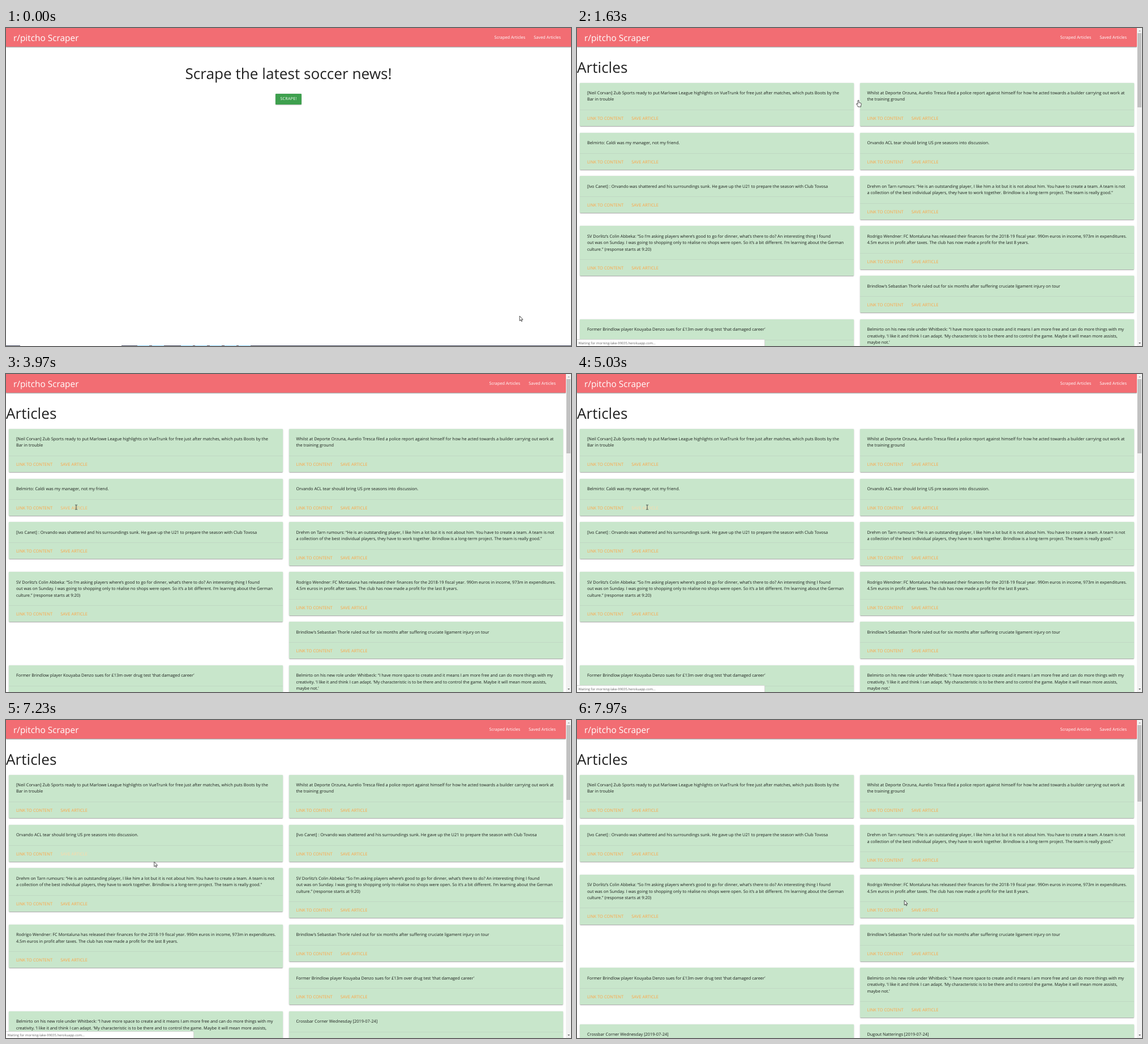
An HTML page that plays this animation: 998 px wide and 561 px high, repeating every 8 s.

```html
<!DOCTYPE html>
<html lang="en">
<head>
<meta charset="utf-8">
<title>Scraper</title>
<style>
  :root { font-size: 7.63px; }
  html, body { margin: 0; width: 100%; height: 100%; overflow: hidden; background: #fff; }
  body { position: relative; font: 7.4px/1.5rem "Open Sans", "Noto Sans", sans-serif;
         color: rgba(0, 0, 0, .87); text-rendering: geometricPrecision; }
  #stage { position: absolute; left: 0; top: 0; width: 998px; height: 561px; overflow: hidden; }
  #stage * { box-sizing: border-box; }

  .page { position: absolute; inset: 0; overflow: hidden; animation: 8s step-end infinite; }
  .home { animation-name: home; }
  .list { visibility: hidden; }
  .list1 { animation-name: list1; --thumb: 131px; }
  .list2 { animation-name: list2; --thumb: 132px; }
  .list3 { animation-name: list3; --thumb: 135px; }
  @keyframes home  { 0% { visibility: visible } 20.375%, 100% { visibility: hidden } }
  @keyframes list1 { 0%, 66.25%, 100% { visibility: hidden } 20.375% { visibility: visible } }
  @keyframes list2 { 0%, 91.25%, 100% { visibility: hidden } 66.25% { visibility: visible } }
  @keyframes list3 { 0% { visibility: hidden } 91.25%, 100% { visibility: visible } }

  .view { position: absolute; left: 0; top: 0; width: 989px; height: 561px; }
  .home .view { width: 998px; }
  nav { position: absolute; left: 0; top: 0; width: 100%; height: 33px; padding: 0 18px 0 13px;
        display: flex; align-items: center; gap: 15px; background: #f26d73; color: #fff; }
  nav, .card { box-shadow: 0 1px 1px rgba(0,0,0,.14), 0 1.5px .5px -1px rgba(0,0,0,.12), 0 .5px 2.5px rgba(0,0,0,.2); }
  nav b { font-size: 15.4px; font-weight: 400; margin-right: auto; padding-top: 1.5px; }
  nav span { padding-top: 1.5px; }
  h1 { position: absolute; left: 0; top: 54px; margin: 0; font-size: 26.2px; font-weight: 400;
       line-height: 30px; white-space: nowrap; }
  .home h1 { top: 65px; width: 100%; text-align: center; }

  .button { position: absolute; left: 476px; top: 116px; width: 46px; height: 18.5px; border-radius: 1px;
            background: #3ea04e; color: #fff; font-size: 7.1px; line-height: 18.5px; letter-spacing: .25px;
            text-align: center; animation: lift 8s linear infinite; }
  @keyframes lift {
    0%, 7.9% { box-shadow: 0 1px 1px rgba(0,0,0,.14), 0 .5px 2.5px rgba(0,0,0,.2) }
    10.375%, 100% { box-shadow: 0 1.5px 1.5px rgba(0,0,0,.16), 0 1px 3.5px rgba(0,0,0,.24) }
  }
  .taskbar { position: absolute; left: 0; top: 560px; width: 100%; height: 1px; background: #474c62;
             animation: taskbar 8s step-end infinite; }
  .taskbar i { position: absolute; top: 0; height: 1px; background: #8fd3f7; }
  @keyframes taskbar { 0% { opacity: 1 } 6.25%, 100% { opacity: 0 } }

  .row { position: absolute; left: 0; top: 92.9px; width: 100%; }
  .col { float: left; width: 50%; padding: 0 .7rem; }
  .col::before, .col::after { content: ""; display: table; }
  .card { margin: .5rem 0 1rem; background: #c8e6cb; border-radius: 1px; }
  .card p { margin: 0; padding: 1.75rem 1.65rem 1.45rem; white-space: pre; }
  .actions { height: 29.3px; padding: 0 1.65rem; border-top: 1px solid rgba(160,160,160,.2);
             line-height: 30.5px; font-size: 7.5px; color: #ffa545; white-space: nowrap; }
  .actions span { margin-right: 1.6rem; }
  .list1 .col:nth-child(3) span + span { animation: hover1 8s linear infinite; }
  .list2 .col:nth-child(3) span + span { animation: hover2 8s linear infinite; }
  @keyframes hover1 { 0%, 48.75% { color: #ffa545 } 52.125%, 100% { color: #ffd8a6 } }
  @keyframes hover2 { 0%, 71.25% { color: #ffa545 } 74.625%, 100% { color: #ffd8a6 } }

  .scrollbar { position: absolute; left: 989px; top: 0; width: 9px; height: 561px; background: #f1f1f1; }
  .scrollbar::before, .scrollbar::after { content: ""; position: absolute; left: 3px; width: 4px; height: 2px; }
  .scrollbar::before { top: 4px; background: #a3a3a3; clip-path: polygon(50% 0, 100% 100%, 0 100%); }
  .scrollbar::after { bottom: 4px; background: #505050; clip-path: polygon(0 0, 100% 0, 50% 100%); }
  .scrollbar i { position: absolute; left: 1px; top: 9px; width: 7px; height: var(--thumb); background: #c1c1c1; }

  .status { position: absolute; left: -1px; top: 549px; width: 333px; height: 13px; padding-left: 2.5px;
            background: #fff; border: 1px solid #d4d4d4; border-top-right-radius: 2px; color: #666;
            font-size: 5.9px; line-height: 12px; white-space: nowrap; animation: status 8s linear infinite; }
  @keyframes status {
    0%, 13.75%, 26.25%, 61.25%, 71.25%, 86.25%, 96.25%, 100% { opacity: 0 }
    16.25%, 23.75%, 62.875%, 68.75%, 87.875%, 93.75% { opacity: 1 }
  }

  .cursor { position: absolute; left: 0; top: 0; width: 0; height: 0; animation: travel 8s linear infinite; }
  .cursor svg { position: absolute; left: 0; top: 0; overflow: visible; animation: 8s step-end infinite; }
  .cursor path { fill: #fff; stroke: #222; stroke-width: .8; stroke-linejoin: round; }
  .cursor .arrow { animation-name: arrow; }
  .cursor .hand { animation-name: hand; }
  .cursor .beam { animation-name: beam; }
  .cursor .beam path { fill: none; }
  @keyframes travel {
    0% { transform: translate(907px, 508px); animation-timing-function: step-end }
    6.25% { transform: translate(497px, 127px); animation-timing-function: step-end }
    38.75% { transform: translate(492px, 129px); animation-timing-function: ease-in-out }
    48.75% { transform: translate(124px, 235px); animation-timing-function: step-end }
    56.25% { transform: translate(124px, 234px); animation-timing-function: step-end }
    62.125%, 87.875% { transform: translate(124px, 235px) }
    90.375% { transform: translate(261px, 250px) }
    97.125% { transform: translate(546px, 303px); animation-timing-function: ease-out }
    99.625%, 100% { transform: translate(578px, 318px) }
  }
  @keyframes arrow { 0%, 38.75%, 87.9%, 100% { opacity: 1 } 6.25%, 47.25% { opacity: 0 } }
  @keyframes hand { 0%, 38.75%, 100% { opacity: 0 } 6.25% { opacity: 1 } }
  @keyframes beam { 0%, 87.9%, 100% { opacity: 0 } 47.25% { opacity: 1 } }
</style>
</head>
<body>
<div id="stage">
  <div class="page home">
    <div class="view">
      <h1>Scrape the latest soccer news!</h1>
      <div class="button">SCRAPE!</div>
      <div class="taskbar"><i style="left:25px;width:179px;background:#fff"></i></div>
    </div>
  </div>
  <div class="status">Waiting for morning-lake-99035.herokuapp.com...</div>
  <div class="cursor">
    <svg class="arrow" width="1" height="1"><path d="M.2 0V8.6L2.2 6.8 3.5 9.7 4.8 9.1 3.5 6.3H6.1Z"/></svg>
    <svg class="hand" width="1" height="1"><path d="M-1 1Q0-.5 1 1V4.7L4.2 5.4Q5.4 5.8 5.2 7.2L4.4 10.3V12H-.9V10.8L-3.4 7.6Q-3.8 6-2.3 6.4L-1 7.6Z"/></svg>
    <svg class="beam" width="1" height="1"><path d="M-2-4H-.5L0-3.5 .5-4H2M0-3.5V3.5M-2 4H-.5L0 3.5 .5 4H2"/></svg>
  </div>
</div>
<script>
  const articles = [
    "[Neil Corvan] Zub Sports ready to put Marlowe League highlights on VueTrunk for free just after matches, which puts Boots by the\nBar in trouble",
    "Whilst at Deporte Orzuna, Aurelio Tresca filed a police report against himself for how he acted towards a builder carrying out work at\nthe training ground",
    "Belmirto: Caldi was my manager, not my friend.",
    "Orvando ACL tear should bring US pre seasons into discussion.",
    "[Ivo Canet] : Orvando was shattered and his surroundings sunk. He gave up the U21 to prepare the season with Club Tovosa",
    "Drehm on Tarn rumours: “He is an outstanding player, I like him a lot but it is not about him. You have to create a team. A team is not\na collection of the best individual players, they have to work together. Brindlow is a long-term project. The team is really good.”",
    "SV Dorlitz’s Colin Abbeka: “So I’m asking players where’s good to go for dinner, what’s there to do? An interesting thing I found\nout was on Sunday. I was going to shopping only to réalise no shops were open. So it’s a bit different. I’m learning about the German\nculture.” (response starts at 9:20)",
    "Rodrigo Wendner: FC Montaluna has released their finances for the 2018-19 fiscal year. 990m euros in income, 973m in expenditures.\n4.5m euros in profit after taxes. The club has now made a profit for the last 8 years.",
    "Brindlow’s Sebastian Thorle ruled out for six months after suffering cruciate ligament injury on tour",
    "Former Brindlow player Kouyaba Denzo sues for £13m over drug test ‘that damaged career’",
    "Belmirto on his new role under Whitbeck: “I have more space to create and it means I am more free and can do more things with my\ncreativity. ‘I like it and think I can adapt. ‘My characteristic is to be there and to control the game. Maybe it will mean more assists,\nmaybe not.’",
    "Crossbar Corner Wednesday [2019-07-24]",
    "Dugout Natterings [2019-07-24]"
  ];

  const nav = `<nav><b>r/pitcho Scraper</b><span>Scraped Articles</span><span>Saved Articles</span></nav>`;
  const card = text => `<div class="col"><div class="card"><p>${text}</p>
    <div class="actions"><span>LINK TO CONTENT</span> <span>SAVE ARTICLE</span></div></div></div>`;

  const page = (items, number) => `<div class="page list list${number}">
    <div class="view">${nav}<h1>Articles</h1><div class="row">${items.map(card).join("")}</div></div>
    <div class="scrollbar"><i></i></div></div>`;

  // Each saved article leaves the third place in the list.
  const pages = [0, 1, 2].map(saved =>
    page([...articles.slice(0, 2), ...articles.slice(2 + saved)], saved + 1));

  document.querySelector(".home .view").insertAdjacentHTML("afterbegin", nav);
  document.querySelector(".home").insertAdjacentHTML("afterend", pages.join(""));
  document.querySelector(".taskbar").insertAdjacentHTML("beforeend",
    [0, 1, 3, 4, 5, 6, 7].map(slot => `<i style="left:${232 + slot * 25.6}px;width:21px"></i>`).join(""));
</script>
</body>
</html>
```
